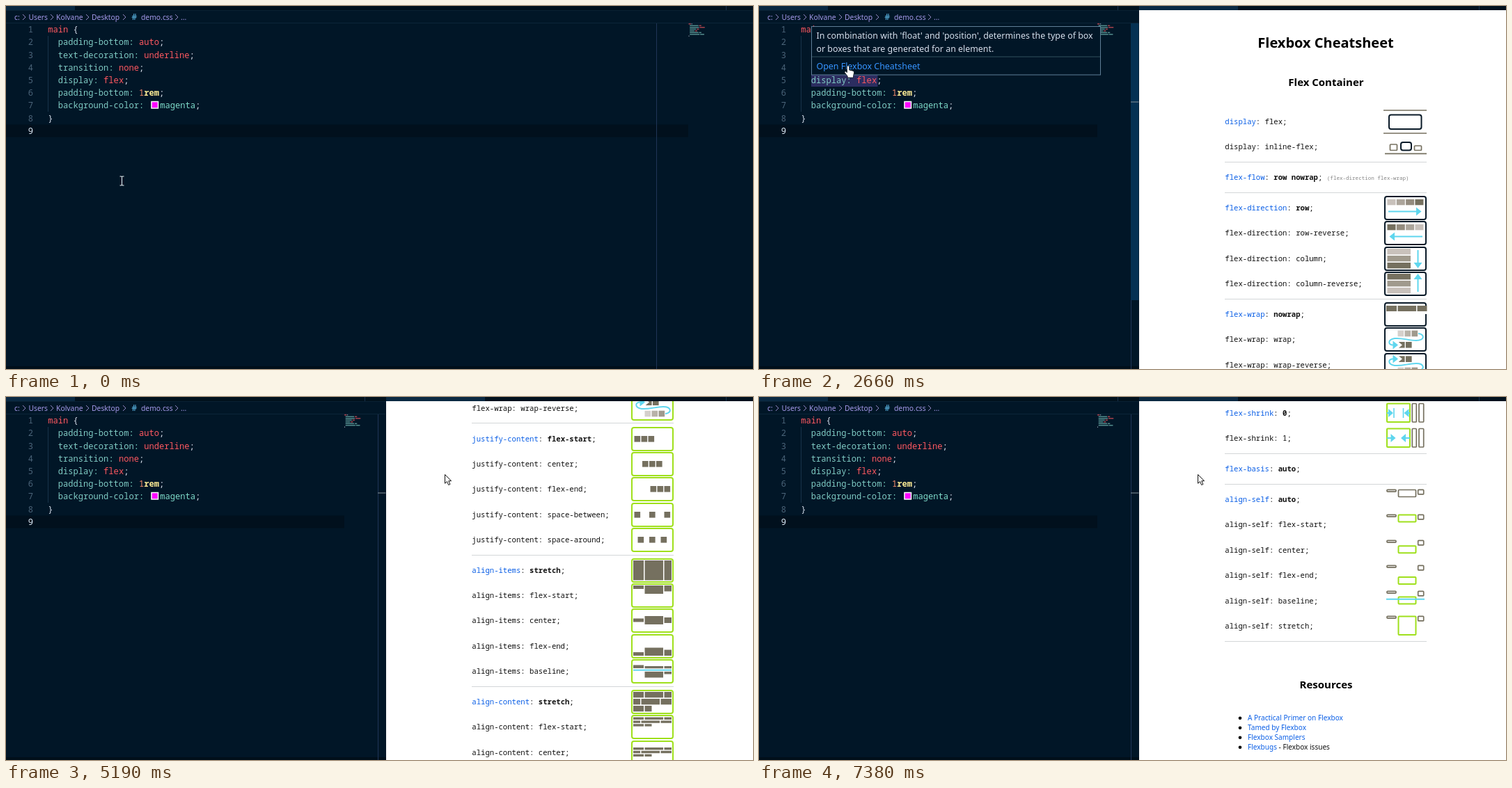
An HTML page that plays this animation: 1073x522 px, repeating every 8.62 s.

```html
<!DOCTYPE html>
<html lang="en">
<head>
<meta charset="utf-8">
<title>Flexbox Cheatsheet</title>
<style>
  html, body { margin: 0; width: 100%; height: 100%; overflow: hidden; background: #011627; }
  svg { display: block; width: 100vw; height: 100vh; --edge: #9fe01c; }
  text { white-space: pre; font-family: "Noto Sans", sans-serif; }
  .mono { font-family: "Noto Sans Mono", monospace; }
  .code { font-size: 12.1px; font-weight: 500; fill: #d6deeb; }
  .prop { font-size: 10.62px; fill: #111; }
  .note { font-size: 7.56px; fill: #858585; }
  .crumb { font-size: 10.35px; fill: #a599e9; }
  .tip { font-size: 12.42px; fill: #d6deeb; }
  .link { font-size: 10.05px; fill: #0b5fe6; }
  .head { font-weight: 700; text-anchor: middle; fill: #000; }
  .strong { font-weight: 700; }
  .prop .strong { font-weight: 600; }
  .edge { fill: none; stroke: var(--edge); stroke-width: 2; }
  .brown { fill: none; stroke: #75705f; stroke-width: 1.7; }
  .cyan { fill: none; stroke: #5fd6ee; stroke-width: 2; }
  .fill { fill: #5fd6ee; }
</style>
</head>
<body>
<svg id="stage" viewBox="0 0 1073 522" preserveAspectRatio="none"></svg>
<script>
const LOOP = 8620;
const stage = document.getElementById('stage');

// Drawing helpers; all return markup.
const rect = (x, y, w, h, fill, extra = '') =>
  `<rect x="${x}" y="${y}" width="${w}" height="${h}" fill="${fill}" ${extra}/>`;
const text = (x, y, cls, body, extra = '') => `<text x="${x}" y="${y}" class="${cls}" ${extra}>${body}</text>`;
const span = (body, fill, bold) =>
  `<tspan${fill ? ` fill="${fill}"` : ''}${bold ? ' class="strong"' : ''}>${body}</tspan>`;
const path = (d, cls, extra = '') => `<path d="${d}" class="${cls}" ${extra}/>`;
const group = (id, body) => `<g id="${id}">${body}</g>`;

// ---------- editor ----------
const RED = '#ff5860', TEAL = '#80cbc4';
const css = [
  ['padding-bottom', 'auto'], ['text-decoration', 'underline'], ['transition', 'none'],
  ['display', 'flex'], ['padding-bottom', '1rem'], ['background-color', 'magenta']
];
const lineY = i => 38.2 + 18.2 * i;

function codeLines() {
  let out = text(60.3, lineY(0), 'mono code', span('main', RED) + ' {');
  css.forEach(([key, value], i) => {
    const y = lineY(i + 1);
    const name = span(key, TEAL) + span(': ', '#7fdbca');
    if (value === 'magenta') {
      out += text(74.8, y, 'mono code', name) + rect(209, 137.5, 9.5, 9.5, '#f0f', 'stroke="#fff" stroke-width="1.5"')
        + text(221.3, y, 'mono code', span(value, '#7fdbca') + ';');
    } else {
      const shown = value === '1rem' ? span('1', '#f78c6c') + span('rem', '#ffeb95', true) : span(value, RED);
      out += text(74.8, y, 'mono code', name + shown + ';');
    }
  });
  out += text(60.3, lineY(7), 'mono code', '}');
  for (let i = 0; i < 9; i++)
    out += text(39, lineY(i), 'mono code', span(i + 1, i === 8 ? '#e4f0fb' : '#4b6479'), 'text-anchor="end"');
  return out + rect(60, 43, 1, 109, '#17324a');
}

function minimap() {
  const unit = 0.83;
  let out = rect(0, 25, 4 * unit, 1.5, RED) + rect(5 * unit, 25, 1, 1.5, '#d6deeb');
  css.forEach(([key, value], i) => {
    const y = 27.5 + 2.5 * i, start = 2 * unit, gap = (key.length + 4) * unit;
    out += rect(start, y, (key.length + 1) * unit, 1.5, TEAL)
      + rect(gap, y, value.length * unit, 1.5, i < 4 ? RED : TEAL);
  });
  return `<g id="minimap" opacity=".65">${out + rect(0, 42.5, 1, 1.5, '#d6deeb')}</g>`;
}

function breadcrumb() {
  const words = [[12, 'c:'], [32.5, 'Users'], [72, 'Kolvane'], [123, 'Desktop'], [194, 'demo.css'], [251, '...']];
  const chevrons = [24, 64, 115, 168, 243].map(x => `M${x} 12l4 4l-4 4`).join('');
  return words.map(([x, word]) => text(x, 19.8, 'crumb', word)).join('')
    + text(180.5, 20.2, 'mono', '#', 'font-size="12.5" font-weight="700" fill="#4c9bc4"')
    + path(chevrons, '', 'fill="none" stroke="#8f89c4"');
}

function tooltip() {
  return rect(75, 99, 95.5, 17, '#2c2d60')
    + text(74.8, lineY(4), 'mono code', span('display', TEAL) + span(': ', '#7fdbca') + span('flex', RED))
    + rect(75.5, 29.5, 415, 69.5, '#011627', 'id="tipBox" stroke="#5f7e97"')
    + rect(76, 72.5, 414, 1, '#33505f', 'id="tipRule"')
    + text(82.5, 47.3, 'tip', "In combination with 'float' and 'position', determines the type of box")
    + text(82.5, 65.6, 'tip', 'or boxes that are generated for an element.')
    + text(82.5, 90.8, 'tip', span('Open Flexbox Cheatsheet', '#3794ff'));
}

// ---------- cheatsheet icons (x from the left edge, y from the row centre) ----------
const SHADES = ['#c8c1bb', '#aca59b', '#948c7f', '#75705f'];
const DARK = SHADES[3];
const frame = (body = '') => rect(1, -16, 59, 33, 'none', 'rx="3" class="edge"') + body;
const outline = (cls, x, y, w, h) => rect(x, y, w, h, 'none', `rx="1" class="${cls}"`);
const flip = (body, sx, sy) => `<g transform="translate(${sx < 0 ? 61 : 0} 0) scale(${sx} ${sy})">${body}</g>`;

const rowArrow = path('M6 5.5H47', 'cyan') + path('M46-.5l7.5 6l-7.5 6z', 'fill');
const shadesRow = list => list.map((c, i) => rect(4.5 + 13.3 * i, -12, 12, 8.3, c)).join('');
const colArrow = path('M48.5-12V8', 'cyan') + path('M42.5 6h12l-6 8z', 'fill');
const shadesCol = list => list.map((c, i) => rect(4.5, -14 + 10 * i, 33.5, 8.4, c)).join('');
const tri = [SHADES[0], '#a09a8d', DARK];

const squares = (xs, y = -4, colors = [DARK, DARK, DARK]) =>
  xs.map((x, i) => rect(x, y, 8.6, 8.6, colors[i])).join('');
const wrapIcon = squares([19.5, 29.5, 39.5], -12.3, ['#d5d0cb', '#b8b2a8', '#a09a8d'])
  + squares([21, 31], 4)
  + path('M49-8c10 1 9 10-3 10C34 2 27-2 15-1C4 1 6 9 13 8.5', 'cyan')
  + path('M20 3.5l6 5l-6 5z', '', 'fill="#fff"') + path('M12.5 2.5l7.5 6l-7.5 6z', 'fill');

const bars = [[3, 15], [19.5, 26.5], [47.5, 10.5]];
const barSet = spans => bars.map(([x, w], i) => rect(x, spans[i][0], w, spans[i][1] - spans[i][0], DARK)).join('');
const rows = [bars, [[3, 10], [14.5, 26.5], [42.5, 15.5]], [[3, 15], [19.5, 10]]];
const rowSet = (tops, h = 3.4) =>
  rows.map((row, i) => row.map(([x, w]) => rect(x, tops[i], w, h, DARK)).join('')).join('');

const sideBoxes = outline('brown', 4, -13.7, 13, 2.8) + outline('brown', 48.7, -13.7, 8, 6.6);
const selfIcon = (top, h = 10, cls = 'edge') => sideBoxes + outline(cls, 20.5, top, 25, h);
const stretchBox = (w, right) => outline('edge', 4, -13.5, w, 26.5)
  + right.map(([x, rw]) => outline('brown', x, -13.5, rw, 26.5)).join('');
const twoHeads = (l, r) => path(`M${l + 6} 0H${r - 6}`, 'cyan')
  + path(`M${l} 0l7-6v12zM${r} 0l-7-6v12z`, 'fill');
const inward = (l, r) => path(`M4 0H${l - 4}M${r + 4} 0H37`, 'cyan')
  + path(`M${l} 0l-7-6v12zM${r} 0l7-6v12z`, 'fill');
const stops = (a, b) => path(`M${a}-7V7M${b}-7V7`, 'cyan', 'style="stroke-width:1.6"');
const growBoxes = stretchBox(36, [[43.5, 4.5], [51.5, 5.2]]);
const shrinkBoxes = stretchBox(33, [[40.3, 6], [50, 6.7]]);

const container = [
  ['display', ['flex', 'inline-flex'], [
    path('M-1-16H61M-1 17H61', 'brown') + rect(7, -9.5, 46.5, 20.5, 'none', 'rx="3" class="edge"'),
    outline('brown', 8.5, -3, 10, 8.5) + rect(24, -6, 15, 11.5, 'none', 'rx="3" class="edge"')
      + outline('brown', 43.5, -1, 10, 6.5) + path('M1 10.3H61', 'brown')]],
  ['flex-flow', ['row nowrap'], [], '(flex-direction flex-wrap)'],
  ['flex-direction', ['row', 'row-reverse', 'column', 'column-reverse'], [
    frame(shadesRow(SHADES) + rowArrow),
    frame(shadesRow([...SHADES].reverse()) + flip(rowArrow, -1, 1)),
    frame(shadesCol(tri) + colArrow),
    frame(shadesCol([...tri].reverse()) + flip(colArrow, 1, -1))]],
  ['flex-wrap', ['nowrap', 'wrap', 'wrap-reverse'], [
    frame(rect(59, -12, 3, 12, '#fff') + rect(3, -12, 15, 8, DARK) + rect(19.5, -12, 26.5, 8, DARK) + rect(47.5, -12, 14, 8, DARK)),
    frame(wrapIcon), frame(flip(wrapIcon, 1, -1))]],
  ['justify-content', ['flex-start', 'center', 'flex-end', 'space-between', 'space-around'],
    [[4.5, 14.5, 24.5], [16, 26, 36], [27.5, 37.5, 47.5], [4.5, 26, 47.5], [9.5, 26, 42.5]].map(xs => frame(squares(xs)))],
  ['align-items', ['stretch', 'flex-start', 'center', 'flex-end', 'baseline'], [
    frame(barSet([[-14, 14.5], [-14, 14.5], [-14, 14.5]])),
    frame(barSet([[-14, -9], [-14, -2], [-14, -5.5]])),
    frame(barSet([[-2.5, 2.5], [-6, 6], [-4, 4]])),
    frame(barSet([[9, 14], [2.5, 14], [5.5, 14]])),
    frame(barSet([[-8.5, -4], [-7, 9.5], [-7, 4.5]]) + rect(3, -3.7, 55, 4.6, '#fff') + rect(3, -2.3, 55, 2, '#5fd6ee'))]],
  ['align-content', ['stretch', 'flex-start', 'center', 'flex-end', 'space-between', 'space-around'], [
    frame(rowSet([-14, -4, 6], 8.3)),
    ...[[-13.5, -8.6, -3.8], [-7, -2.2, 2.6], [1.5, 6.3, 11.2], [-13.5, -2.2, 11.5], [-10.5, -2, 6.5]]
      .map(tops => frame(rowSet(tops)))]]
];

const item = [
  ['order', ['0'], [
    outline('brown', 4, -13.5, 13, 6.5) + outline('edge', 20.5, -13.5, 25, 10) + outline('brown', 48.7, -13.5, 8, 6.5)
    + path('M33.5 1.5C31 14 12 14 7.5 1', 'cyan') + path('M3.5-4.5l10 5.5l-10.5 4z', 'fill')]],
  ['flex', ['0 1 auto'], [], '(flex-grow flex-shrink flex-basis)'],
  ['flex-grow', ['0', '1'], [growBoxes + stops(8.5, 36) + twoHeads(11, 33.5), growBoxes + twoHeads(6.5, 37.5)]],
  ['flex-shrink', ['0', '1'], [shrinkBoxes + stops(14, 27.5) + inward(13, 28.5), shrinkBoxes + inward(16.5, 24)]],
  ['flex-basis', ['auto'], []],
  ['align-self', ['auto', 'flex-start', 'center', 'flex-end', 'baseline', 'stretch'], [
    selfIcon(-13.5, 10, 'brown'), selfIcon(-13.5), selfIcon(-5.7), selfIcon(3),
    selfIcon(-5.5) + path('M3-2.2H58', 'cyan'), selfIcon(-13.5, 26.5)]]
];

// Rows flow at fractional heights and are painted on whole pixels.
function section(groups, top) {
  const ROW = 36.35, GAP = 7.5;
  let out = '', flow = top;
  groups.forEach(([key, values, icons, note]) => {
    values.forEach((value, i) => {
      const first = i === 0, y = Math.round(flow);
      out += text(669.3, y + 3.7, 'mono prop', span(key, first && '#0b5fe6') + ': ' + span(value, '', first && key !== 'display') + ';');
      if (note) out += text(669.3 + (key.length + value.length + 4) * 6.372, y + 3.9, 'mono note', note);
      if (icons[i]) out += `<g transform="translate(898 ${y})">${icons[i]}</g>`;
      flow += ROW;
    });
    out += rect(669, Math.round(flow - 14.7), 290, 1, '#d3d6d8');
    flow += GAP;
  });
  return out;
}

function sheet() {
  const links = ['A Practical Primer on Flexbox', 'Tamed by Flexbox', 'Flexbox Samplers', 'Flexbugs' + span(' - Flexbox issues', '#111')];
  return text(814, 60, 'head', 'Flexbox Cheatsheet', 'font-size="20"')
    + text(814.5, 115, 'head', 'Flex Container', 'font-size="15"')
    + section(container, 166)
    + text(814, 1210, 'head', 'Flex Item', 'font-size="15"')
    + section(item, 1262.2)
    + text(814.5, 1826, 'head', 'Resources', 'font-size="15"')
    + links.map((body, i) => text(702, 1872 + 14 * i, 'link', body) + `<circle cx="691" cy="${1868.7 + 14 * i}" r="2.3"/>`).join('');
}

// ---------- pointers (origin at the hotspot) ----------
const pointers = group('beam', path('M-3-6.5h2.2l.8.8l.8-.8H3M0-6V6M-3 6.5h2.2l.8-.8l.8.8H3', '', 'fill="none" stroke="#e8edf0" stroke-width="1.1"'))
  + group('hand', path('M-1.6.8Q0-1.2 1.6.8V6l5.4 1.3q1.8.6 1.6 2.7L7.5 14.5V17H-.8V15L-5 9.5q-.5-1.8 1.4-1.6L-1.6 9.6z', '', 'fill="#fff" stroke="#08121c" stroke-width=".8"'))
  + group('arrow', path('M.5.5V13.2l3-2.7l2.2 5l2.2-1l-2.1-4.8H9.6z', '', 'fill="#fff" stroke="#111" stroke-width="1"'));

stage.innerHTML = `<clipPath id="pane"><rect x="546" y="6" width="527" height="516"/></clipPath>`
  + rect(0, 0, 1073, 522, '#011627')
  + rect(0, 0, 1073, 7, '#01111d') + rect(0, 6, 1073, 1, '#0a2133') + rect(0, 0, 99, 6, '#0b2942') + rect(1034, 0, 1, 6, '#17304a')
  + group('splitTabs', rect(515, 0, 1, 6, '#17304a') + rect(546, 0, 142, 6, '#0b2942'))
  + rect(0, 24, 1073, 1, '#0b2538', 'id="crumbRule"')
  + breadcrumb()
  + rect(0, 170.5, 980, 18, '#01101d', 'id="current"')
  + rect(0, 518, 1073, 4, '#010f1a')
  + codeLines() + minimap()
  + rect(934, 25, 1, 497, '#1f3557', 'id="ruler"')
  + group('scrollbar', rect(534, 25, 11.5, 398, '#053153'))
  + group('marker', rect(534, 137.5, 11.5, 1, '#8a949c'))
  + group('tooltip', tooltip())
  + `<g id="page" clip-path="url(#pane)">${rect(546, 6, 527, 516, '#fff')}${group('sheet', sheet())}</g>`
  + group('pointer', pointers);

// ---------- timeline ----------
const $ = id => document.getElementById(id);
const show = (id, on) => $(id).setAttribute('visibility', on ? 'visible' : 'hidden');
const set = (id, name, value) => $(id).setAttribute(name, value);
const ease = p => p * p * (3 - 2 * p);

// Number of evenly spaced steps already taken; the first lands on start, the last on end.
const taken = (t, start, end, n) =>
  t < start ? 0 : Math.min(n, Math.floor((t - start) / ((end - start) / (n - 1)) + 1e-6) + 1);

const moves = [
  [400, 780, 6, 105.5, 104], [1410, 1720, 5, 128, 86],
  [2970, 3300, 5, 630, 107], [3530, 3600, 2, 630, 111]
];
const scrolls = [
  [4160, 4570, [30, 75, 120, 160, 188, 200]],
  [4820, 5190, [249, 320, 390, 445, 485, 500]],
  [5590, 5970, [540, 620, 695, 758, 790, 800]],
  [6220, 6750, [830, 900, 980, 1060, 1140, 1216, 1275, 1300]],
  [7080, 7380, [1330, 1365, 1390, 1403, 1407]]
];

function pointerAt(t) {
  let x = 166.5, y = 251.5;
  for (const [start, end, n, toX, toY] of moves) {
    const p = ease(taken(t, start, end, n) / n);
    x += (toX - x) * p;
    y += (toY - y) * p;
  }
  return [x, y];
}

function scrollAt(t) {
  let y = 0;
  for (const [start, end, offsets] of scrolls) {
    const k = taken(t, start, end, offsets.length);
    if (k) y = offsets[k - 1];
  }
  return y;
}

function draw(t) {
  const split = t >= 1890, [x, y] = pointerAt(t);
  const tipOn = t >= 1090 && x < 491 && t < 3300;
  const kind = x > 546 ? 'arrow' : tipOn && y < 99 && x < 232 ? 'hand' : 'beam';

  ['beam', 'hand', 'arrow'].forEach(id => show(id, id === kind));
  set('pointer', 'transform', `translate(${x} ${y})`);

  show('tooltip', tipOn);
  set('tooltip', 'opacity', t < 1160 ? 0.5 : 1);
  set('tipBox', 'width', split ? 415 : 428);
  set('tipRule', 'width', split ? 414 : 427);

  show('splitTabs', split);
  show('marker', split);
  show('scrollbar', split && t < 3940);
  set('crumbRule', 'width', split ? 545 : 1073);
  set('current', 'width', split ? 486 : 980);
  set('ruler', 'x', split ? 534 : 934);
  set('minimap', 'transform', `translate(${split ? 486 : 980.5} 0)`);

  show('page', t >= 2660);
  set('sheet', 'transform', `translate(0 ${-scrollAt(t)})`);
  stage.style.setProperty('--edge', t < 4160 ? '#0a1a28' : '#9fe01c');
}

function tick() {
  draw(performance.now() % LOOP);
  requestAnimationFrame(tick);
}
tick();
</script>
</body>
</html>
```
